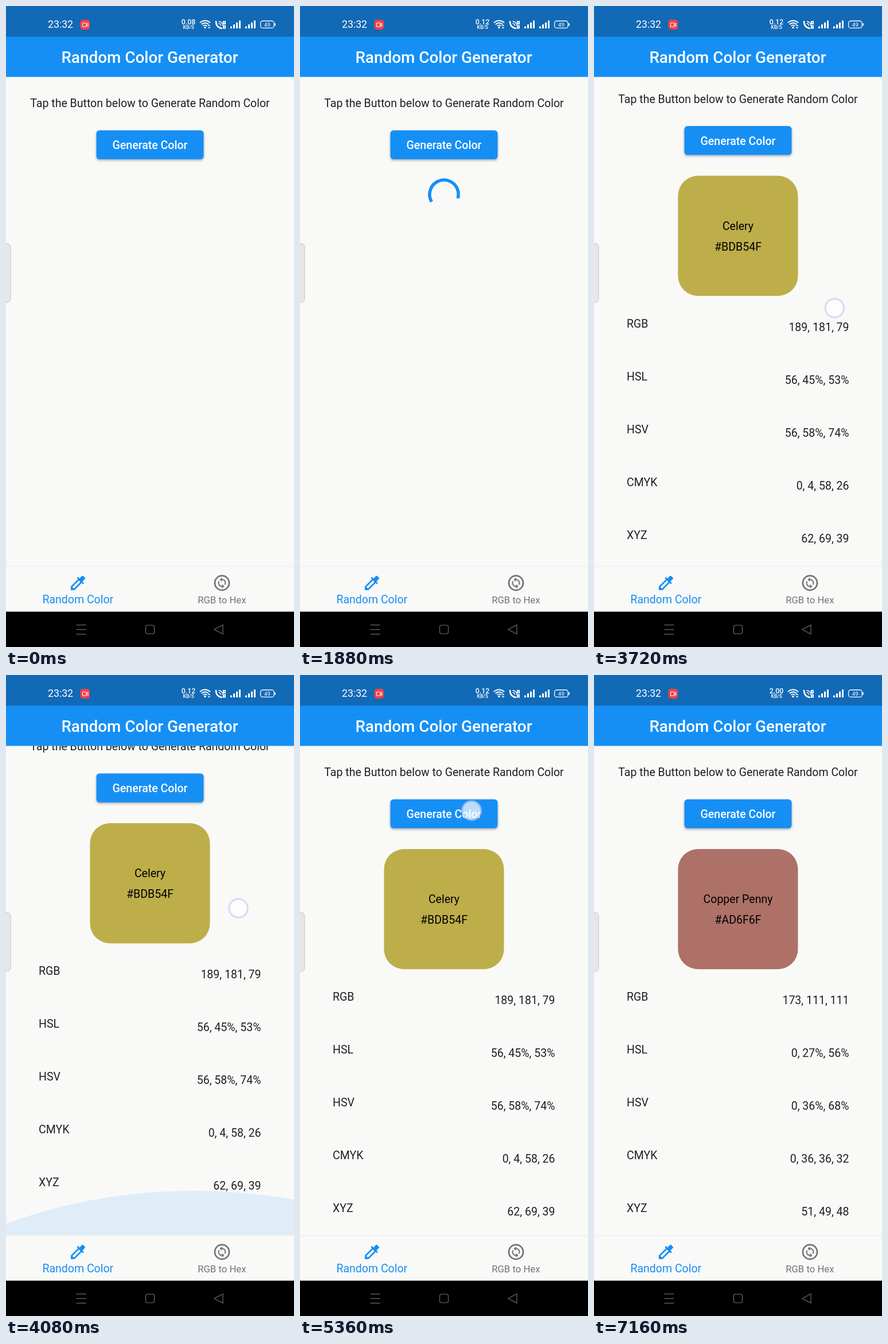
An HTML page with a canvas that plays this animation: 502 px wide and 1116 px high, repeating every 8 s.

```html
<!DOCTYPE html>
<html lang="en">
<head>
<meta charset="utf-8">
<title>Random Color Generator</title>
<style>
html, body { margin: 0; width: 100%; height: 100%; overflow: hidden; background: #f9f9f8; }
canvas { display: block; width: 502px; height: 1116px; }
</style>
</head>
<body>
<canvas id="stage"></canvas>
<script>
const W = 502, H = 1116, LOOP = 8000, STEP = 40;
const TOP = 123.5, BOTTOM = 975, NAV = 1054.5;
const BLUE = '#168ff5', PAPER = '#f9f9f8', INK = '#202020', GREY = '#747474';
const canvas = document.getElementById('stage');
const ctx = canvas.getContext('2d');
const dpr = window.devicePixelRatio || 1;
canvas.width = W * dpr;
canvas.height = H * dpr;

const results = [
  { from: 2800, to: 5500, fill: '#bdae4a', name: 'Celery', hex: '#BDB54F',
    rows: ['189, 181, 79', '56, 45%, 53%', '56, 58%, 74%', '0, 4, 58, 26', '62, 69, 39'] },
  { from: 7080, to: LOOP, fill: '#ad7168', name: 'Copper Penny', hex: '#AD6F6F',
    rows: ['173, 111, 111', '0, 27%, 56%', '0, 36%, 68%', '0, 36, 36, 32', '51, 49, 48'] }
];
const labels = ['RGB', 'HSL', 'HSV', 'CMYK', 'XYZ'];
const loads = [[1055, 2800], [5500, 7080]];
const taps = [{ t: 920, up: 1055, x: 290, y: 240 }, { t: 5360, up: 5500, x: 299, y: 236 }];

// Keys are [time, value]
const scrollKeys = [[3680, 0], [3920, 45], [4280, 45], [4440, 35], [4800, 0]];
const glowKeys = [[3880, 0], [4080, .763], [4220, .763], [4440, .33], [4840, 0]];
const dragX = [[3600, 425], [3960, 408], [4080, 405], [4260, 400], [4440, 391], [4760, 380]];
const dragY = [[3600, 560], [3700, 535], [3960, 418], [4080, 406], [4260, 406], [4440, 425], [4760, 470]];

const clamp = v => Math.max(0, Math.min(1, v));

function track(keys, t) {
  if (t <= keys[0][0]) return keys[0][1];
  for (let i = 1; i < keys.length; i++) {
    const [t0, a] = keys[i - 1], [t1, b] = keys[i];
    if (t < t1) return a + (b - a) * (t - t0) / (t1 - t0);
  }
  return keys[keys.length - 1][1];
}

// cubic-bezier(.4, 0, .2, 1)
function ease(x) {
  if (x <= 0) return 0;
  if (x >= 1) return 1;
  let lo = 0, hi = 1, u = .5;
  for (let i = 0; i < 20; i++) {
    u = (lo + hi) / 2;
    const bx = 1.2 * u * (1 - u) ** 2 + .6 * u * u * (1 - u) + u ** 3;
    if (bx < x) lo = u; else hi = u;
  }
  return u * u * (3 - 2 * u);
}

function text(str, x, y, size, color, align = 'left', weight = 400) {
  ctx.font = `${weight} ${size}px Roboto, sans-serif`;
  ctx.fillStyle = color;
  ctx.textAlign = align;
  ctx.fillText(str, x, y);
}

function rect(x, y, w, h, color) {
  ctx.fillStyle = color;
  ctx.fillRect(x, y, w, h);
}

function rounded(x, y, w, h, r) {
  ctx.beginPath();
  ctx.roundRect(x, y, w, h, r);
}

function stroke(color, width) {
  ctx.strokeStyle = color;
  ctx.lineWidth = width;
  ctx.stroke();
}

function poly(...pts) {
  ctx.beginPath();
  for (let i = 0; i < pts.length; i += 2) ctx.lineTo(pts[i], pts[i + 1]);
  ctx.closePath();
}

function arc(x, y, r, a = 0, b = Math.PI * 2) {
  ctx.beginPath();
  ctx.arc(x, y, r, a, b);
}

const buttonShape = () => rounded(157.5, 216.6, 187, 50.2, 5.5);

function button(t) {
  ctx.save();
  ctx.shadowColor = 'rgba(0,0,0,.32)';
  ctx.shadowBlur = 4 * dpr;
  ctx.shadowOffsetY = 2 * dpr;
  buttonShape();
  ctx.fillStyle = BLUE;
  ctx.fill();
  ctx.restore();
  for (const tap of taps) {
    const age = t - tap.t;
    if (age <= 0 || age > 520) continue;
    const alpha = .2 * clamp(age / 75) * (1 - clamp((t - tap.up) / 375));
    ctx.save();
    buttonShape();
    ctx.clip();
    arc(tap.x, tap.y, 150 * ease(age / 340));
    ctx.fillStyle = `rgba(255,255,255,${alpha})`;
    ctx.fill();
    ctx.restore();
  }
  text('Generate Color', 251, 249, 19.52, '#fff', 'center', 500);
}

function spinner(age) {
  const cycle = age / 1333 % 1, spin = age / 2222;
  const head = ease(cycle * 2), tail = ease(cycle * 2 - 1);
  const start = Math.PI * (-.5 + 1.5 * tail + 2 * spin + .5 * cycle);
  const sweep = Math.max(1.5 * Math.PI * (head - tail), .001);
  ctx.lineCap = 'square';
  arc(251, 328, 25.1, start, start + sweep);
  stroke(BLUE, 5.58);
  ctx.lineCap = 'butt';
}

function swatch(item) {
  rounded(146.4, 303.1, 209.1, 209.1, 34.9);
  ctx.fillStyle = item.fill;
  ctx.fill();
  text(item.name, 251, 397, 19.52, '#000', 'center');
  text(item.hex, 251, 433, 19.52, '#000', 'center');
  labels.forEach((label, i) => {
    text(label, 57, 567 + 92 * i, 19.52, INK);
    text(item.rows[i], 444.5, 573 + 92 * i, 19.52, INK, 'right');
  });
}

// Overscroll glow: a wide circle squashed against the list's lower edge
function glow(t) {
  const s = track(glowKeys, t);
  if (s <= 0) return;
  const r = W * 1.5, lift = W * .201;
  const x = W / 2 * (.5 + track(dragX, t) / W);
  ctx.beginPath();
  ctx.ellipse(x, BOTTOM + (r - lift) * s, r, r * s, 0, 0, Math.PI * 2);
  ctx.fillStyle = `rgba(22,143,245,${.01 + .14 * s})`;
  ctx.fill();
}

function list(t) {
  ctx.save();
  ctx.beginPath();
  ctx.rect(0, 123, W, BOTTOM - 123);
  ctx.clip();
  ctx.save();
  ctx.translate(0, -track(scrollKeys, t));
  text('Tap the Button below to Generate Random Color', 251, 176, 19.52, INK, 'center');
  button(t);
  for (const [from, to] of loads) if (t >= from && t < to) spinner(t - from);
  for (const item of results) if (t >= item.from && t < item.to) swatch(item);
  ctx.restore();
  glow(t);
  ctx.restore();
}

function signal(x) {
  for (let i = 0; i < 4; i++) {
    const h = 3.5 + 3.4 * i;
    rect(x + 5 * i, 39 - h, 3, h, '#fff');
  }
}

function handset() {
  ctx.lineCap = 'round';
  ctx.beginPath();
  ctx.moveTo(366, 27);
  ctx.quadraticCurveTo(366, 37, 376, 39);
  stroke('#fff', 2.6);
  for (const r of [3.5, 7]) {
    arc(371, 34, r, -Math.PI / 2, 0);
    stroke('#fff', 1.5);
  }
  ctx.lineCap = 'butt';
  rect(378, 26, 5, 6, '#fff');
  rect(378, 33.5, 5, 6, '#fff');
  rect(380, 28, 1.2, 2, '#1269b5');
  rect(380, 35.5, 1.2, 2, '#1269b5');
}

function statusBar(t) {
  rect(0, 0, W, 54, '#1269b5');
  text('23:32', 73, 38, 17.7, '#fff');

  rounded(129.5, 24, 16.5, 17, 4.5);
  ctx.fillStyle = '#f44149';
  ctx.fill();
  rounded(133.5, 29.5, 6.5, 6.5, 1);
  stroke('#fff', 1.1);
  poly(140, 32, 143, 30, 143, 35.5, 140, 33.5);
  stroke('#fff', 1);

  const speed = t < 1320 ? '0.08' : t < 6200 ? '0.12' : '2.00';
  text(speed, 318, 32, 12.4, '#fff', 'center', 500);
  text('KB/S', 318.2, 40, 8.6, '#fff', 'center', 500);

  for (const r of [4.5, 8.5, 12.5]) {
    arc(347, 38, r, -Math.PI * .76, -Math.PI * .24);
    stroke('#fff', 1.9);
  }
  arc(347, 37.5, 1.8);
  ctx.fillStyle = '#fff';
  ctx.fill();
  poly(351.5, 35, 354, 32.5, 356.5, 35);
  ctx.fill();
  poly(351.5, 37, 354, 39.5, 356.5, 37);
  ctx.fill();

  handset();
  signal(391);
  signal(417);

  rounded(443.6, 26, 23.5, 12.4, 4);
  stroke('#fff', 1.3);
  rect(468.2, 30, 1.6, 4.5, '#fff');
  text('49', 455.4, 35.8, 9.6, '#fff', 'center');
}

function appBar() {
  rect(0, 53.5, W, TOP - 53.5, BLUE);
  text('Random Color Generator', 250.5, 98.5, 27.88, '#fff', 'center', 500);
}

const dropper = new Path2D('M20.71 5.63l-2.34-2.34c-.39-.39-1.02-.39-1.41 0l-3.12 3.12-1.93-1.91-1.41 1.41 1.42 1.42L3 16.25V21h4.75l8.92-8.92 1.42 1.42 1.41-1.41-1.92-1.92 3.12-3.12c.4-.4.4-1.03.01-1.42zM6.92 19L5 17.08l8.06-8.06 1.92 1.92L6.92 19z');
const hook = new Path2D('M4.17 2.76l-1.1-1.1c.71-1.33.53-3.01-.59-4.13C1.79-3.16.9-3.5 0-3.5h-.06v2.15l-2.83-2.82L-.06-7v2.02c1.3-.02 2.61.45 3.6 1.45 1.7 1.7 1.91 4.35.63 6.29z');

function inIcon(x, y, draw) {
  ctx.save();
  ctx.translate(x, y);
  ctx.scale(1.394, 1.394);
  draw();
  ctx.restore();
}

function swapIcon() {
  arc(0, 0, 9);
  stroke(GREY, 2);
  ctx.fillStyle = GREY;
  ctx.fill(hook);
  ctx.rotate(Math.PI);
  ctx.fill(hook);
}

function bottomBar() {
  rect(0, BOTTOM, W, 80, PAPER);
  rect(0, BOTTOM, W, 1.5, '#efeff2');
  inIcon(125.5, 1004.5, () => {
    ctx.translate(-12, -12);
    ctx.fillStyle = BLUE;
    ctx.fill(dropper);
  });
  inIcon(376.5, 1004.5, swapIcon);
  text('Random Color', 125.3, 1039.5, 19.52, BLUE, 'center');
  text('RGB to Hex', 376.3, 1040, 16.73, GREY, 'center');

  rect(0, NAV, W, H - NAV, '#000');
  for (const y of [1077, 1085, 1093]) rect(122.5, y, 17, 1.2, '#6c6c6c');
  rounded(243.5, 1078, 15, 15, 3.5);
  stroke('#6c6c6c', 1.2);
  poly(363, 1085.5, 378, 1077.5, 378, 1093.5);
  stroke('#6c6c6c', 1.2);
}

function edgeHandle() {
  rounded(-10, 413.5, 18, 102.5, 6);
  ctx.fillStyle = '#e7e7e6';
  ctx.fill();
  stroke('#c6c6c5', 1);
}

function dot(x, y, alpha) {
  ctx.save();
  ctx.globalAlpha = alpha;
  const disc = ctx.createRadialGradient(x, y, 0, x, y, 19);
  disc.addColorStop(0, 'rgba(255,255,255,.7)');
  disc.addColorStop(.74, 'rgba(255,255,255,.7)');
  disc.addColorStop(.83, 'rgba(194,200,236,.85)');
  disc.addColorStop(1, 'rgba(205,215,250,0)');
  arc(x, y, 19);
  ctx.fillStyle = disc;
  ctx.fill();
  ctx.restore();
}

function touches(t) {
  for (const tap of taps) {
    if (t >= tap.t && t < tap.up + 80) dot(tap.x, tap.y, 1 - clamp((t - tap.up) / 80));
  }
  if (t >= 3600 && t < 4840) {
    dot(track(dragX, t), track(dragY, t), 1 - clamp((t - 4760) / 80));
  }
}

function draw(t) {
  ctx.setTransform(dpr, 0, 0, dpr, 0, 0);
  rect(0, 0, W, H, PAPER);
  list(t);
  statusBar(t);
  appBar();
  bottomBar();
  edgeHandle();
  touches(t);
}

let begin;
function tick(now) {
  if (begin === undefined) begin = now;
  const t = (now - begin) % LOOP;
  draw(Math.floor(t / STEP) * STEP);
  requestAnimationFrame(tick);
}
draw(0);
requestAnimationFrame(tick);
</script>
</body>
</html>
```
